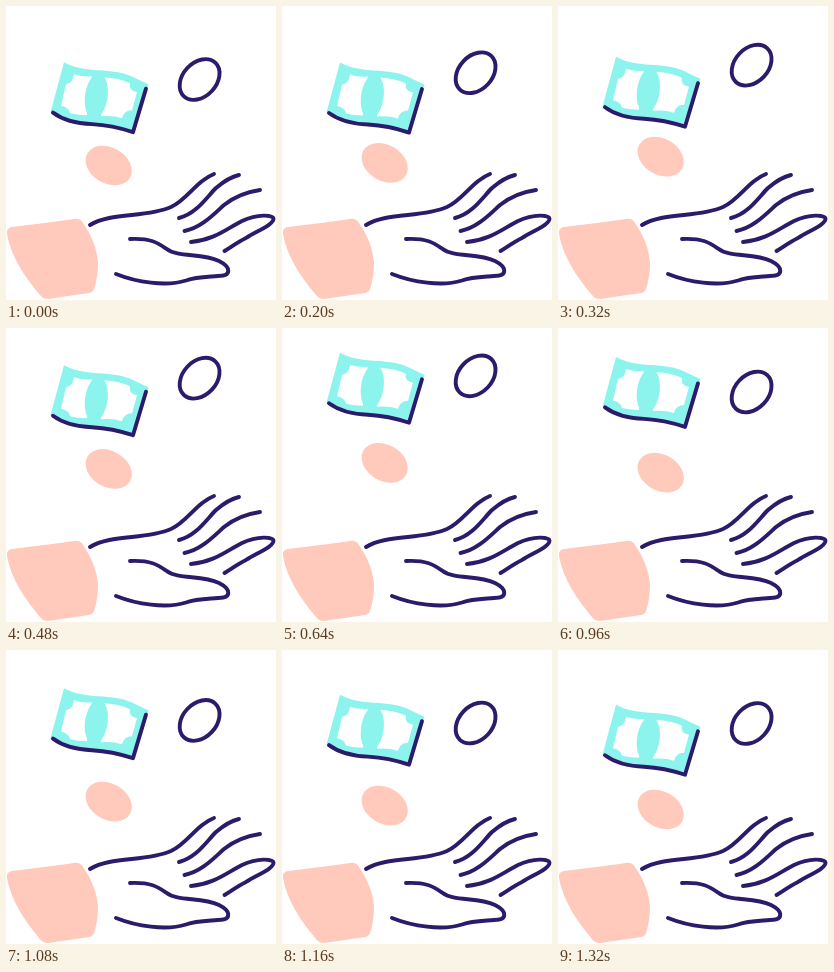
Write an HTML page with a canvas that moves like this. It is 270x294 px and loops after 1.36 s.

```html
<!DOCTYPE html>
<html lang="en">
<head>
<meta charset="utf-8">
<title>Hand and money</title>
<style>
  html, body { margin: 0; width: 100%; height: 100%; overflow: hidden; background: #fff; }
  canvas { display: block; filter: blur(.5px); }
</style>
</head>
<body>
<canvas id="stage" width="270" height="294"></canvas>
<script>
const ctx = document.getElementById('stage').getContext('2d');
const LOOP = 1360;
const STEP = 40;
const NAVY = '#2c1a6b';
const PINK = '#ffc9bc';
const AQUA = '#8cf4ed';

const sleeve = new Path2D('M6 221 C28 218 50 216 68 213 Q74 212 77 217 C86 230 91 243 92 257 Q92 271 88 283 Q87 286 83 287 L42 293 Q37 293 34 289 C18 270 5 250 1 228 Q0 222 6 221Z');
const hand = new Path2D(
  'M84 219 C105 206 140 212 165 201 C182 193 190 175 208 168' +
  'M173 212 C190 208 200 192 210 182 C217 176 224 171 233 169' +
  'M178.5 225 C195 222 208 208 218 199 C228 191 240 186 254 184' +
  'M185 236 C208 234 220 223 236 215 C252 207.5 267 209 267.5 212.5 C268 219 250 225 240 232 C232 236 225 241 218.5 245' +
  'M124 233 C145 232 152 237 160 242.5 C172 252 195 246.5 213 255 C225 261 226 270 212 270 C200 271 190 271 180 274.5 C160 281 130 276 110 268');
const note = new Path2D('M58 56 C72 64 87 63 104 65 C122 66 130 73 142.5 78 L128 127 C115 121 102 119 86 119 C70 118 58 114 44.5 106Z');
const panels = new Path2D(
  'M68 68 Q77 71 86 70 L81 109 Q72 109 64 107 Q63 101 55 99.5 L60 78 Q67 77 68 68Z' +
  'M98 71 Q114 72 124 77 Q122 84 131 86 L126 104 Q118 104 116 112 Q107 109 95 110Z');
const noteEdge = new Path2D('M47 106.5 C57 114 71 117.5 86 118 C104 119 115 122 127 126 L140 82.5');

const smooth = u => {
  const x = Math.min(1, Math.max(0, u));
  return x * x * (3 - 2 * x);
};

// Height from 0 to 1: eased rise, eased fall, then rest.
function lift(time, start, fall) {
  const rise = 600;
  const t = (time - start + LOOP) % LOOP;
  return t < rise ? smooth(t / rise) : 1 - smooth((t - rise) / fall);
}

function ellipse(x, y, rx, ry, degrees) {
  const path = new Path2D();
  path.ellipse(x, y, rx, ry, degrees * Math.PI / 180, 0, 2 * Math.PI);
  return path;
}

function fill(path, color) {
  ctx.fillStyle = color;
  ctx.fill(path);
}

function shifted(dy, paint) {
  ctx.save();
  ctx.translate(0, dy);
  paint();
  ctx.restore();
}

const ring = ellipse(193.6, 73.5, 23, 16.8, -47);
const coin = ellipse(102.7, 159.5, 24.6, 18, 30);
const seal = ellipse(90.3, 90, 11.3, 22.5, 8);

function draw(time) {
  ctx.fillStyle = '#fff';
  ctx.fillRect(0, 0, 270, 294);
  ctx.strokeStyle = NAVY;
  ctx.lineWidth = 3.9;
  ctx.lineCap = ctx.lineJoin = 'round';

  fill(sleeve, PINK);
  ctx.stroke(hand);
  shifted(-26 * lift(time, 0, 610), () => ctx.stroke(ring));
  shifted(-25 * lift(time, 80, 640), () => fill(coin, PINK));
  shifted(1 - 36 * lift(time, 160, 660), () => {
    fill(note, AQUA);
    fill(panels, '#fff');
    fill(seal, AQUA);
    ctx.stroke(noteEdge);
  });
}

const begin = performance.now();
function tick() {
  const time = (performance.now() - begin) % LOOP;
  draw(Math.floor(time / STEP) * STEP);
  requestAnimationFrame(tick);
}
tick();
</script>
</body>
</html>
```
